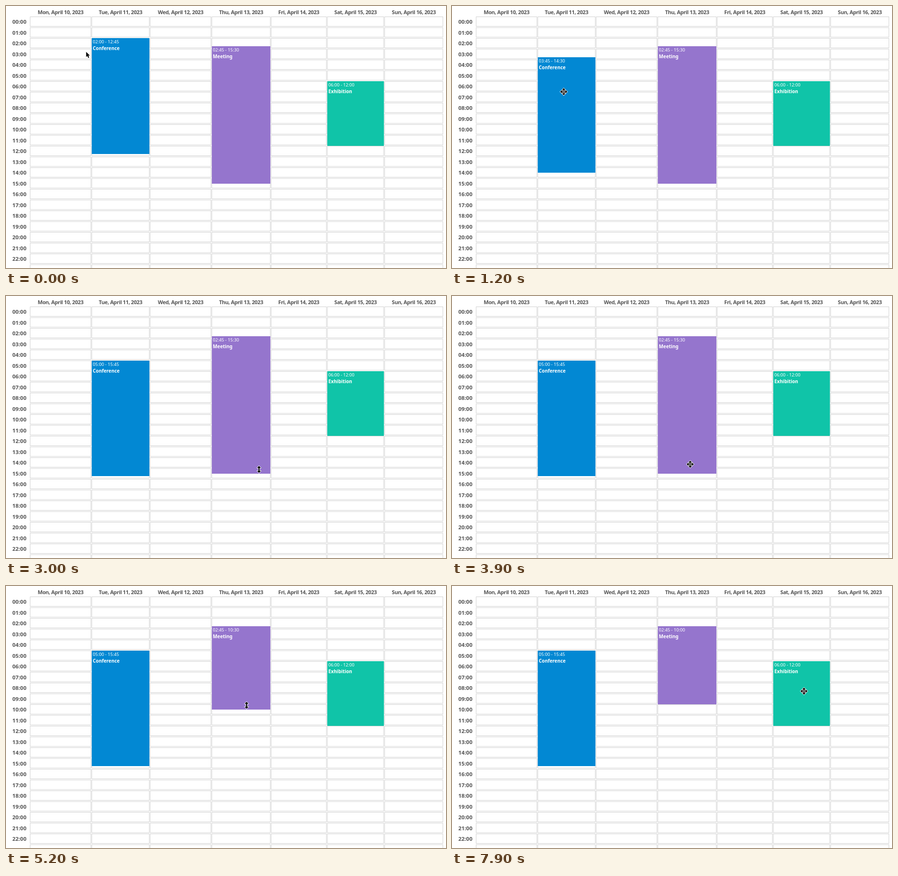
Recreate the animation shown at these times as an HTML page. Size 920 by 547 pixels, loop 8000 ms.

```html
<!DOCTYPE html>
<html lang="en">
<head>
<meta charset="utf-8">
<title>Week schedule</title>
<style>
  html, body { margin: 0; width: 100%; height: 100%; overflow: hidden; background: #fff; }
  svg { display: block; }
  text { font-family: "Noto Sans", "Open Sans", sans-serif; fill: #fff; }
  .day, .hour { fill: #555; font-weight: 600; text-anchor: middle; }
  .day { font-size: 11px; letter-spacing: -.4px; }
  .hour { font-size: 11.4px; }
  .cell { fill: none; stroke: #d2d2d2; }
  .span { font-size: 9.2px; }
  .name { font-size: 9.9px; font-weight: 700; }
  .outlined { stroke: #fff; stroke-width: 1.6; paint-order: stroke; stroke-linejoin: round; }
</style>
</head>
<body>
<svg width="920" height="547" viewBox="0 0 920 547">
  <g id="grid"></g>
  <g id="events"></g>
  <g id="pointer">
    <path id="arrow" class="outlined" d="M0.6 0.8V11.6L3.1 9.3L5 13.4L6.9 12.5L5.1 8.6H8.4Z"/>
    <g id="move">
      <path fill="#fff" d="M0 -8.5L8.5 0L0 8.5L-8.5 0Z"/>
      <path d="M0 -7.4L3.6 -3.8H-3.6ZM0 7.4L3.6 3.8H-3.6ZM-7.4 0L-3.8 -3.6V3.6ZM7.4 0L3.8 -3.6V3.6Z"/>
      <circle r="2.9" fill="#fff" stroke="#000" stroke-width="1.3"/>
      <circle r="1.2"/>
    </g>
    <path id="resize" class="outlined" d="M0 -7.3L4 -2.9H1.2V2.9H4L0 7.3L-4 2.9H-1.2V-2.9H-4Z"/>
  </g>
</svg>
<script>
const LOOP = 8000, STEP = 100, TOP = 22, ROW = 22.5;
const $ = id => document.getElementById(id);

function add(parent, tag, attrs, text = "") {
  const el = document.createElementNS("http://www.w3.org/2000/svg", tag);
  for (const key in attrs) el.setAttribute(key, attrs[key]);
  el.textContent = text;
  return parent.appendChild(el);
}

const pad = n => String(n).padStart(2, "0");
const clock = h => pad(Math.floor(h)) + ":" + pad(h % 1 * 60);
const hourY = h => TOP + h * ROW;
const quarter = h => Math.round(h * 4) / 4;
const clamp = (v, lo, hi) => Math.min(Math.max(v, lo), hi);

const days = ["Mon", "Tue", "Wed", "Thu", "Fri", "Sat", "Sun"];
const edges = [50.5, 179.5, 301.5, 430.5, 554.5, 671.9, 791.8, 915.5];
const column = i => ({ left: edges[i], right: edges[i + 1] - 2 });

days.forEach((day, i) => {
  const { left, right } = column(i);
  add($("grid"), "text", { class: "day", x: (left + right) / 2, y: 16.5 }, `${day}, April ${10 + i}, 2023`);
  for (let h = 0; h < 24; h++)
    add($("grid"), "rect", { class: "cell", x: left, y: hourY(h) + .5, width: right - left, height: 20 });
});
for (let h = 0; h < 24; h++)
  add($("grid"), "text", { class: "hour", x: 28, y: hourY(h) + 15.2 }, clock(h));

function makeEvent(name, day, color) {
  const { left, right } = column(day);
  const x = left - .2;
  const g = add($("events"), "g", {});
  const box = add(g, "rect", { x, width: right + .4 - x, fill: color });
  const span = add(g, "text", { class: "span", x: x + 2.2, y: 11.2 });
  add(g, "text", { class: "name", x: x + 2.2, y: 24.5 }, name);
  const event = { left, right };
  event.set = (start, end) => {
    event.top = Math.ceil(hourY(start));
    event.bottom = Math.round(hourY(end));
    g.setAttribute("transform", `translate(0 ${event.top})`);
    box.setAttribute("height", event.bottom - event.top);
    span.textContent = clock(start) + " - " + clock(end);
  };
  return event;
}

const conference = makeEvent("Conference", 1, "#0288d3");
const meeting = makeEvent("Meeting", 3, "#9575cd");
const exhibition = makeEvent("Exhibition", 5, "#10c4a8");
exhibition.set(6, 12);

// Pointer gestures: first step, last step, x and y reached
const gestures = [
  [200, 500, 239, 124.5], [700, 800, 238, 119], [1000, 1600, 231, 215], [1900, 2100, 233, 193],
  [2700, 2900, 648, 376], [3000, 3000, 529, 362], [3100, 3200, 511, 374],
  [3400, 3800, 492, 335], [3900, 4100, 504, 367], [4500, 4900, 503, 264],
  [5100, 5200, 503, 249], [5600, 5600, 503, 251.5], [5800, 6000, 503, 246],
  [6200, 6400, 503, 254], [6900, 7200, 503.5, 246], [7400, 7900, 736, 219.5]
];
// Press and release times
const moveDrags = [[600, 2200]];
const resizeDrags = [[4400, 5300], [5700, 7300]];

const easeOut = k => 1 - (1 - k) ** 1.75;

function pointerAt(t) {
  let x = 167, y = 95;
  for (const [first, last, toX, toY] of gestures) {
    const k = easeOut(clamp((t - first + STEP) / (last - first + STEP), 0, 1));
    x += (toX - x) * k;
    y += (toY - y) * k;
  }
  return { x, y };
}

// Hours dragged so far; an event trails the pointer by one step
function dragged(drags, t) {
  return drags.reduce((sum, [press, release]) => {
    const now = clamp(t - STEP, press, release);
    return sum + quarter((pointerAt(now).y - pointerAt(press).y) / ROW);
  }, 0);
}

function pointerKind(t, { x, y }) {
  const over = [conference, meeting, exhibition].find(e =>
    x >= e.left && x <= e.right && y >= e.top && y <= e.bottom);
  if (!over) return "arrow";
  const resizing = resizeDrags.some(([press, release]) => t > press && t < release);
  return resizing || over.bottom - y < 10 ? "resize" : "move";
}

function draw(time) {
  const t = Math.floor(time % LOOP / STEP) * STEP;
  const shift = dragged(moveDrags, t);
  conference.set(2 + shift, 12.75 + shift);
  meeting.set(2.75, 15.5 + dragged(resizeDrags, t));
  const pos = pointerAt(t), kind = pointerKind(t, pos);
  for (const id of ["arrow", "move", "resize"])
    $(id).style.display = id === kind ? "" : "none";
  $("pointer").setAttribute("transform", `translate(${pos.x} ${pos.y})`);
}

const begin = performance.now();
function tick() {
  draw(performance.now() - begin);
  requestAnimationFrame(tick);
}
tick();
</script>
</body>
</html>
```
